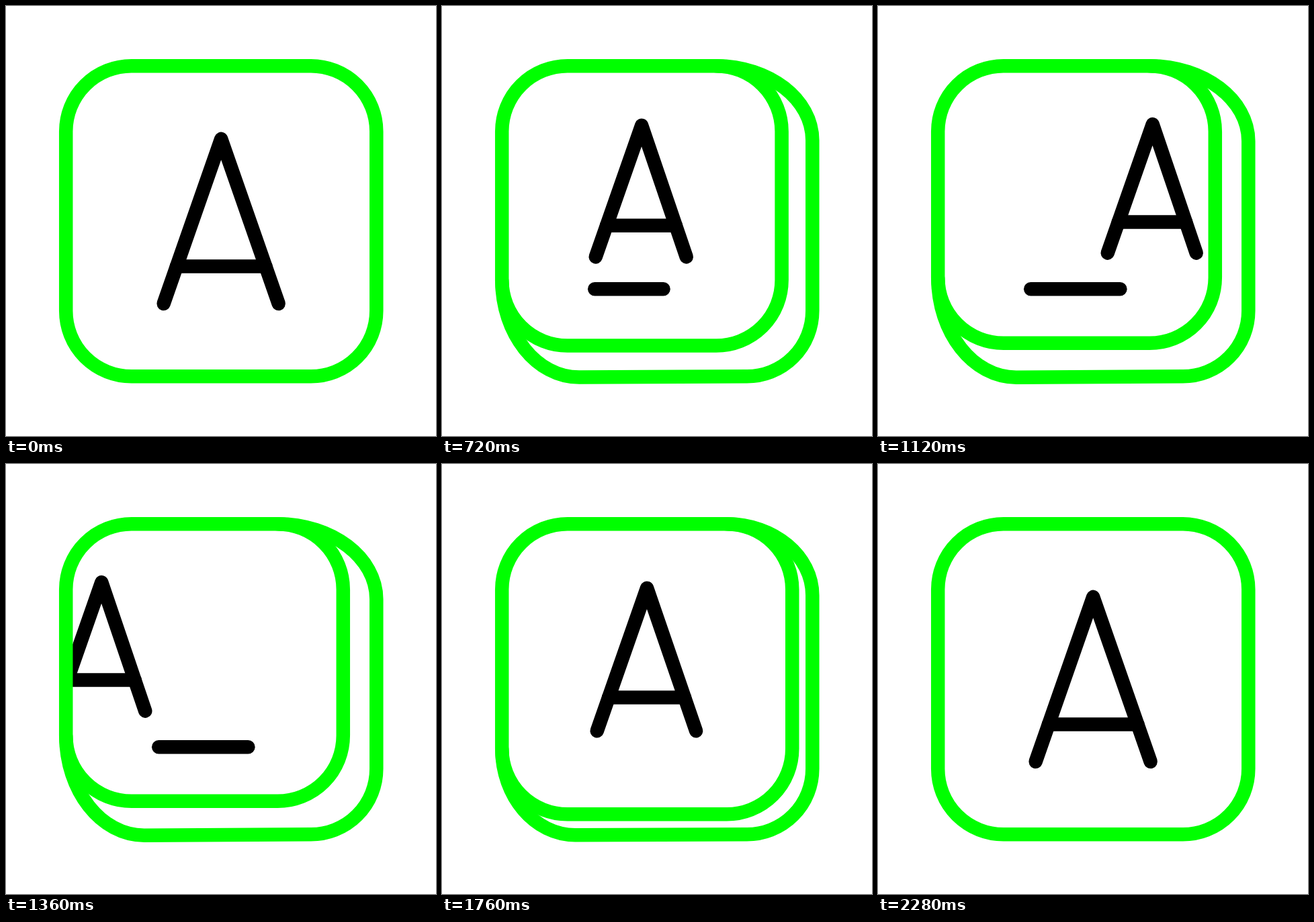
An HTML page with a canvas for the animation above (2480 ms loop, 640 px wide and 640 px high).

```html
<!DOCTYPE html>
<html lang="en">
<head>
<meta charset="utf-8">
<title>Key</title>
<style>
html, body { margin: 0; width: 100%; height: 100%; overflow: hidden; background: #fff; }
canvas { display: block; width: 640px; height: 640px; }
</style>
</head>
<body>
<canvas id="stage" width="640" height="640"></canvas>
<script>
const ctx = document.getElementById('stage').getContext('2d');
const LOOP = 2480, STEP = 40;
const NEAR = 89.2, FAR = 551.3, RADIUS = 97.5, DEPTH = 49.5;
const SLIDE = 275;
const KAPPA = 0.5523;

const mix = (a, b, k) => a + (b - a) * k;

// Cubic-bezier timing curve, solved by bisection
function bezier(x1, y1, x2, y2) {
  const at = (a, b, u) => 3 * a * u * (1 - u) ** 2 + 3 * b * u * u * (1 - u) + u ** 3;
  return x => {
    if (x <= 0) return 0;
    if (x >= 1) return 1;
    let lo = 0, hi = 1;
    for (let i = 0; i < 30; i++) {
      const u = (lo + hi) / 2;
      if (at(x1, x2, u) < x) lo = u; else hi = u;
    }
    return at(y1, y2, lo);
  };
}
const inOut = bezier(0.42, 0, 0.58, 1);
const settle = bezier(0.25, 0.1, 0.25, 1);
const phase = (t, start, length, ease) => ease((t - start) / length);

function line(points) {
  ctx.beginPath();
  points.forEach(([x, y]) => ctx.lineTo(x, y));
  ctx.stroke();
}

function keyFace(p) {
  const size = FAR - NEAR - DEPTH * p;
  ctx.beginPath();
  ctx.roundRect(NEAR, NEAR, size, size, RADIUS);
}

// Rear edge, stretched from the two outer corners of the face
function keyBack(p) {
  const corner = FAR - RADIUS;
  const start = corner - DEPTH * p;
  const top = NEAR + RADIUS + 14.5 * p;
  const left = NEAR + RADIUS + 19 * p;
  const base = FAR + 1.4 * p;
  ctx.beginPath();
  ctx.moveTo(start, NEAR);
  ctx.bezierCurveTo(mix(start, FAR, KAPPA), NEAR, FAR, mix(top, NEAR, KAPPA), FAR, top);
  ctx.lineTo(FAR, corner);
  ctx.arc(corner, corner, RADIUS, 0, Math.PI / 2);
  ctx.lineTo(left, base);
  ctx.bezierCurveTo(mix(left, NEAR, KAPPA), base, NEAR, mix(start, base, KAPPA), NEAR, start);
  ctx.stroke();
}

function letter(p, shift) {
  const apex = [mix(320.2, 295.2, p) + shift, mix(197.9, 176.1, p)];
  const foot = mix(443, 367.6, p);
  const l = [mix(234.6, 228.2, p) + shift, foot];
  const r = [mix(405.7, 360.2, p) + shift, foot];
  const bar = mix(387.6, 321.6, p);
  const k = (bar - apex[1]) / (foot - apex[1]);
  line([l, apex, r]);
  line([[mix(apex[0], l[0], k), bar], [mix(apex[0], r[0], k), bar]]);
}

function underline(from, to) {
  if (to <= from) return;
  const x = k => mix(227.2, 360.4, k);
  line([[x(from), 421.2], [x(to), 421.2]]);
}

function draw(t) {
  const p = phase(t, 140, 720, inOut) - phase(t, 1593, 687, settle);
  const travel = 2 * SLIDE * phase(t, 884, 750, inOut);
  const shift = travel > SLIDE ? travel - 2 * SLIDE : travel;

  ctx.fillStyle = '#fff';
  ctx.fillRect(0, 0, 640, 640);
  ctx.lineWidth = 20.5;
  ctx.lineCap = ctx.lineJoin = 'round';

  ctx.save();
  keyFace(p);
  ctx.clip();
  ctx.strokeStyle = '#000';
  letter(p, shift);
  underline(phase(t, 1372, 360, inOut), phase(t, 480, 360, inOut));
  ctx.restore();

  ctx.strokeStyle = '#0f0';
  if (p > 0) keyBack(p);
  keyFace(p);
  ctx.stroke();
}

const begin = performance.now();
function tick() {
  const t = (performance.now() - begin) % LOOP;
  draw(Math.floor(t / STEP) * STEP);
  requestAnimationFrame(tick);
}
tick();
</script>
</body>
</html>
```
